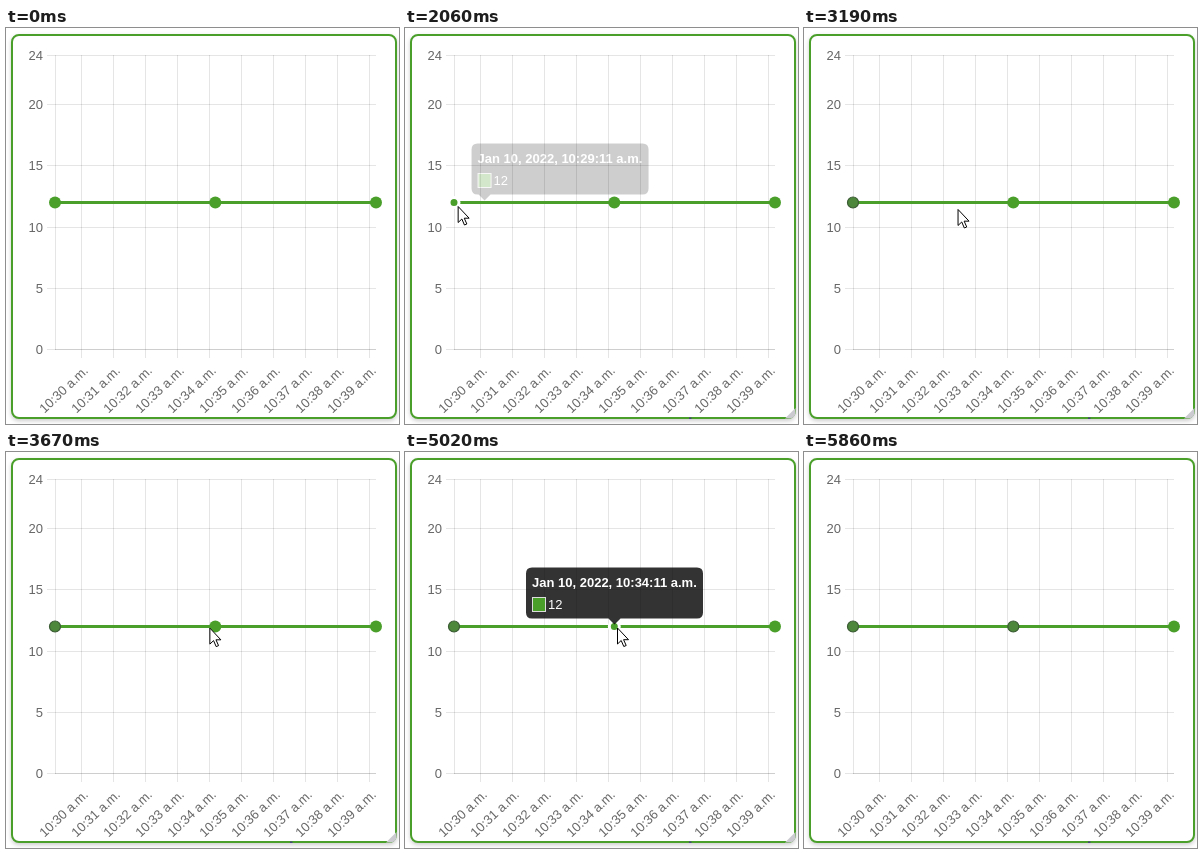
Recreate the animation shown at these times as an HTML page. Size 393 by 396 pixels, loop 6490 ms.

```html
<!DOCTYPE html>
<html lang="en">
<head>
<meta charset="utf-8">
<title>Line chart with tooltip</title>
<style>
  html, body { margin: 0; width: 100%; height: 100%; overflow: hidden; background: #fff; }
  svg { display: block; font: 13px "Liberation Sans", Arial, sans-serif; }
  #card { fill: #fff; stroke: #4a9f2b; stroke-width: 2; filter: drop-shadow(0 2px 2px #0003); }
  #grid path { stroke: #0000001a; }
  #labels { fill: #666; text-anchor: end; }
  .dot { fill: #4a9f2b; }
  .dot.seen { fill: #4d873b; stroke: #3c5c36; stroke-width: 1.2; }
  .dot.hover { fill: #4a9f2b; stroke: #fff; stroke-width: 3; }
  #tip text { fill: #fff; }
</style>
</head>
<body>
<svg width="393" height="396" viewBox="0 0 393 396">
  <rect id="card" x="6" y="7" width="384" height="383" rx="7"/>
  <g id="grid"></g>
  <g id="labels"></g>
  <path d="M49 174.5H370" stroke="#4a9f2b" stroke-width="3"/>
  <g id="dots"></g>
  <path id="grip" d="M390.500 380V385Q390 390 384 390.500H380Z" fill="#cbcad1"/>
  <rect id="speck" x="284" y="389.5" width="2.500" height="1.500" fill="#44447a"/>
  <g id="tip">
    <path id="bubble" fill="#000" fill-opacity=".8"/>
    <text x="6" y="134.500" font-weight="bold" id="title"></text>
    <rect x="6.500" y="145.500" width="13" height="14" fill="#4a9f2b" stroke="#ddd"/>
    <text x="22" y="157">12</text>
  </g>
  <path id="cursor" d="M.5 .5V16.500L4.200 13L6.800 19L9.200 18L6.600 12.200H11.500Z" fill="#fff" stroke="#000"/>
</svg>
<script>
const LOOP = 6490, START = 725, STEP = 70.2;
const $ = id => document.getElementById(id);
const clamp = v => Math.max(0, Math.min(1, v));

function add(parent, tag, attrs, text = "") {
  const el = document.createElementNS("http://www.w3.org/2000/svg", tag);
  for (const k in attrs) el.setAttribute(k, attrs[k]);
  el.textContent = text;
  $(parent).append(el);
  return el;
}
const gridLine = d => add("grid", "path", { d });

for (const v of [0, 5, 10, 15, 20, 24]) {
  const y = Math.floor(321.8 - v * 12.27) + 0.5;
  gridLine(`M41 ${y}H370`);
  add("labels", "text", { x: 37, y: y + 4.5 }, v);
}
gridLine("M49 321.5H370");
gridLine("M49.5 27V322");
for (let i = 0; i < 10; i++) {
  const x = 75.5 + 32 * i;
  gridLine(`M${x} 27V330`);
  add("labels", "text", { transform: `translate(${x + 7.5} 343.5) rotate(-43.5)` }, `10:${30 + i} a.m.`);
}
const dots = [49, 209.3, 370].map(cx => add("dots", "circle", { cx, cy: 174.5, r: 6 }));

// Pointer path: time, x, y
const path = [
  [725, 287, 390], [930, 210, 325], [1150, 122, 250], [1360, 90, 221],
  [1430, 89, 219], [1710, 72, 190], [1970, 54, 178], [2300, 49, 178], [2560, 47.5, 176],
  [2780, 47.5, 176], [2910, 70, 180], [3190, 156, 181], [3460, 197, 178],
  [3640, 205, 175], [3950, 210, 175], [4160, 212, 175.5],
  [5020, 212, 175.5], [5160, 216, 180], [5300, 235, 200], [5510, 300, 272],
  [5650, 344, 325], [5790, 384, 374], [5850, 393, 396]
];

// One tooltip visit per hovered point
const visits = [
  { dot: 0, on: 1975, off: 2850, from: 108, to: 40, slide: 400, caret: 13, title: "Jan 10, 2022, 10:29:11 a.m." },
  { dot: 1, on: 3640, off: 5160, from: 40, to: 121, slide: 480, caret: 88.5, title: "Jan 10, 2022, 10:34:11 a.m." }
];

function pointerAt(t) {
  const i = path.findIndex(p => p[0] > t);
  if (i < 1) return null;
  const [t0, x0, y0] = path[i - 1], [t1, x1, y1] = path[i];
  const k = (t - t0) / (t1 - t0);
  return [x0 + (x1 - x0) * k, y0 + (y1 - y0) * k];
}

function show(el, on) {
  el.style.display = on ? "" : "none";
}

function drawTip(t) {
  const v = visits.find(v => t >= v.on && t < v.off + 200);
  show($("tip"), v);
  if (!v) return;
  const x = v.to + (v.from - v.to) * (1 - clamp((t - v.on) / v.slide)) ** 4;
  const fade = Math.min(clamp((t - v.on) / 350), 1 - clamp((t - v.off) / 200));
  $("tip").setAttribute("transform", `translate(${x} 0)`);
  $("tip").setAttribute("opacity", fade);
  $("title").textContent = v.title;
  $("bubble").setAttribute("d",
    `M6 115.5H171q6 0 6 6V160.5q0 6-6 6H${v.caret + 6}l-6 6l-6-6H6q-6 0-6-6V121.5q0-6 6-6Z`);
}

function draw(now) {
  const raw = now % LOOP;
  // The picture advances in fixed steps
  const t = raw < START ? 0 : START + Math.floor((raw - START) / STEP) * STEP;
  const pos = pointerAt(t);
  show($("cursor"), pos);
  if (pos) $("cursor").setAttribute("transform", `translate(${pos})`);
  show($("grip"), t > 860 && t < 5840);
  show($("speck"), t > 790);
  for (const v of visits) {
    const hover = t >= v.on && t < v.off;
    const dot = dots[v.dot];
    dot.setAttribute("class", hover ? "dot hover" : t >= v.off ? "dot seen" : "dot");
    dot.setAttribute("r", hover ? 5 : t >= v.off ? 5.5 : 6);
  }
  drawTip(t);
}

dots[2].setAttribute("class", "dot");
const begin = performance.now();
function tick() {
  draw(performance.now() - begin);
  requestAnimationFrame(tick);
}
tick();
</script>
</body>
</html>
```
